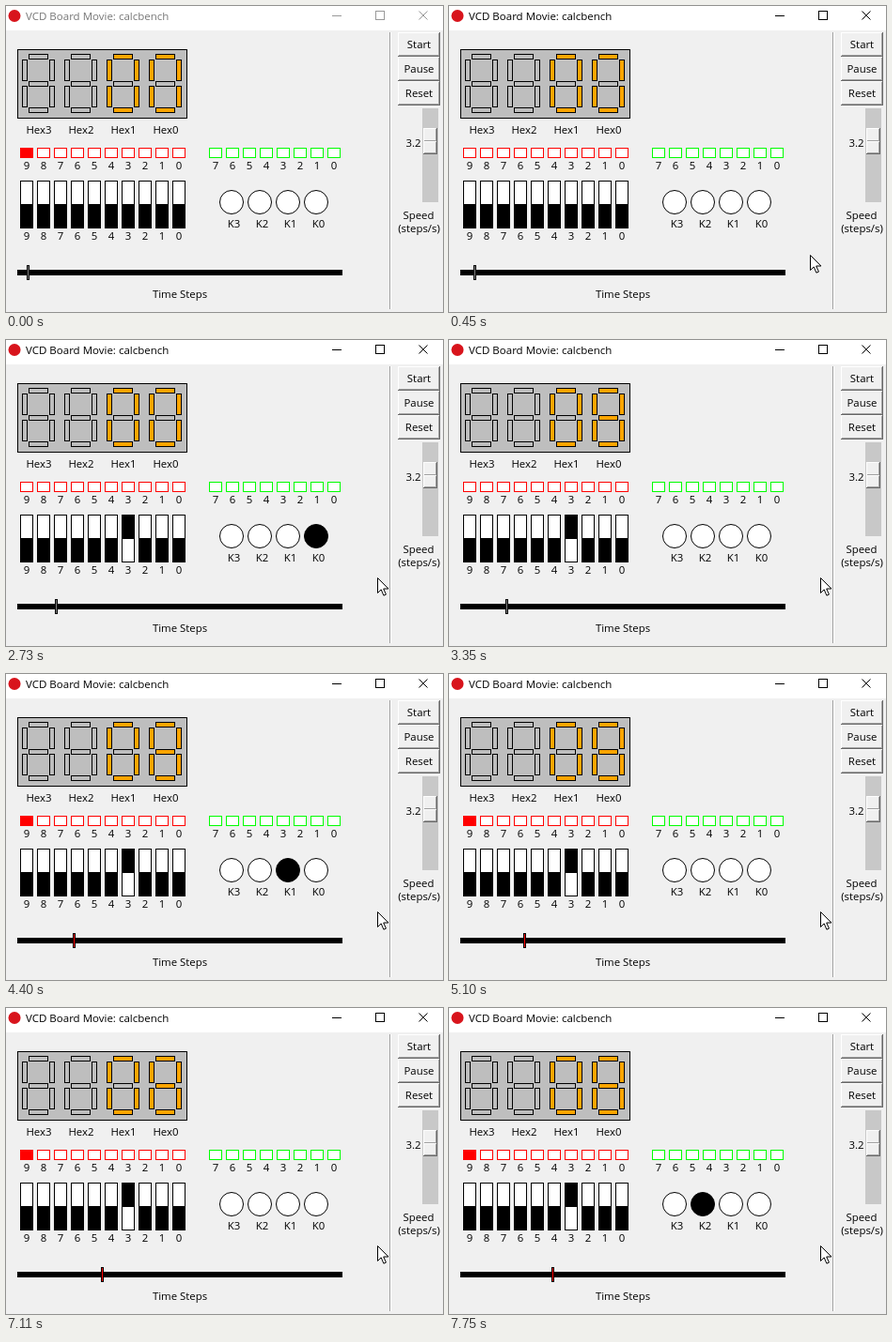
Animation, 465 px wide and 326 px high, one loop 8000 ms. Source, as an HTML page:

```html
<!DOCTYPE html>
<html lang="en">
<head>
<meta charset="utf-8">
<title>VCD Board Movie</title>
<style>
  html, body { margin: 0; width: 100%; height: 100%; overflow: hidden; background: #f0f0f0; }
  svg { display: block; }
  rect, line, .crisp { shape-rendering: crispEdges; }
  text { font: 11.4px "Open Sans", "Noto Sans", sans-serif; text-anchor: middle; }
  #title { font-size: 11.5px; text-anchor: start; }
</style>
</head>
<body>
<svg id="stage" width="465" height="326" viewBox="0 0 465 326"></svg>
<script>
const LOOP = 8000;
const STEP_TIMES = [0, 370, 680, 990, 1290, 1710, 2030, 2350, 2730, 3050, 3350, 3750,
  4070, 4400, 4720, 5100, 5420, 5720, 6100, 6410, 6730, 7110, 7430, 7750];
const SWITCH_STEP = 7, RESULT_STEP = 9;
const PRESSES = [[8, 0], [12, 1], [18, 0], [22, 2]]; // [step, key], held for two steps

const fill = (x, y, w, h, color, id = '') =>
  `<rect id="${id}" x="${x}" y="${y}" width="${w}" height="${h}" fill="${color}"/>`;
const box = (x, y, w, h, color, stroke = '#000', id = '') =>
  `<rect id="${id}" x="${x + .5}" y="${y + .5}" width="${w - 1}" height="${h - 1}" fill="${color}" stroke="${stroke}"/>`;
const label = (x, y, text) => `<text x="${x}" y="${y}">${text}</text>`;
const raised = (x, y, w, h) =>
  fill(x, y, w, h, '#696969') + fill(x, y, w - 1, h - 1, '#fff') +
  fill(x + 1, y + 1, w - 2, h - 2, '#a0a0a0') + fill(x + 1, y + 1, w - 3, h - 3, '#f0f0f0');

function digit(x, place) {
  const lit = place < 2 ? '#ffa500' : '#bebebe';
  const side = [[0, 57], [29, 57], [0, 85], [29, 85]];
  return side.map(([dx, y]) => box(x + dx, y, 6, 23, lit)).join('') +
    box(x + 7, 51, 21, 6, lit) + box(x + 7, 108, 21, 6, lit) +
    box(x + 7, 80, 21, 6, '#bebebe', '#000', 'mid' + place) +
    label(x + 18, 136, 'Hex' + place);
}

function lamps(x, count, color, name) {
  let out = '';
  for (let i = 0; i < count; i++) {
    const n = count - 1 - i;
    out += box(x + 18 * i, 151, 14, 11, '#fff', color, name + n) + label(x + 7 + 18 * i, 174, n);
  }
  return out;
}

function toggles() {
  let out = '';
  for (let i = 0; i < 10; i++) {
    const x = 15 + 18 * i, n = 9 - i;
    out += box(x, 186, 14, 51, '#fff') + fill(x, 211, 14, 26, '#000', 'switch' + n) + label(x + 7, 249, n);
  }
  return out;
}

function keys() {
  let out = '';
  for (let k = 0; k < 4; k++) {
    const x = 330 - 30 * k;
    out += `<circle id="key${k}" cx="${x}" cy="209" r="12.5" stroke="#000"/>` + label(x + 2.5, 236, 'K' + k);
  }
  return out;
}

const titleBar = fill(0, 0, 465, 26, '#fff') +
  '<circle cx="9" cy="10.5" r="6.5" fill="#d8141c"/>' +
  '<text id="title" x="21" y="15">VCD Board Movie: calcbench</text>' +
  '<g id="controls" fill="none"><path class="crisp" d="M347 10.5h10M393.5 5.5h9v9h-9z"/>' +
  '<path d="M439.5 5.5l9 9M448.5 5.5l-9 9"/></g>';

const sidePanel = fill(408, 28, 1, 295, '#a0a0a0') + fill(409, 28, 1, 295, '#fff') +
  ['Start', 'Pause', 'Reset'].map((name, i) =>
    raised(417, 28 + 26 * i, 45, 26) + label(439.5, 45 + 26 * i, name)).join('') +
  fill(443, 109, 17, 100, '#c8c8c8') + raised(444, 130, 15, 28) +
  fill(445, 143, 13, 1, '#a0a0a0') + fill(445, 144, 13, 1, '#fff') +
  label(433.5, 150, '3.2') + label(439, 227, 'Speed') + label(439.5, 241, '(steps/s)');

const $ = id => document.getElementById(id);
$('stage').innerHTML = fill(0, 0, 465, 326, '#f0f0f0') + titleBar + sidePanel +
  box(12, 46, 181, 74, '#bebebe') +
  [3, 2, 1, 0].map((place, i) => digit(17 + 45 * i, place)).join('') +
  lamps(15, 10, '#f00', 'red') + lamps(216, 8, '#0f0', 'green') + toggles() + keys() +
  fill(12, 281, 346, 6, '#000') + label(185, 311, 'Time Steps') +
  '<g id="marker">' + fill(0, 276, 3, 16, '#000') + fill(1, 277, 1, 14, '#808080', 'core') + '</g>' +
  '<path id="cursor" d="M.5.5v16l3.7-3.6 2.7 6.3 2.5-1.1-2.7-6.1h5.2z" fill="#fff" stroke="#000"/>';

const set = (id, name, value) => $(id).setAttribute(name, value);

// The pointer glides in from the bottom edge, sampled every 76 ms.
function drawPointer(t) {
  const active = t >= 70;
  set('title', 'fill', active ? '#000' : '#777');
  set('controls', 'stroke', active ? '#000' : '#999');
  set('cursor', 'visibility', active ? 'visible' : 'hidden');
  const tick = Math.min(8, Math.floor((t - 70) / 76));
  const rest = (1 - tick / 8) ** 1.65;
  set('cursor', 'transform', `translate(${Math.round(395 - 55 * rest)} ${Math.round(253 + 60 * rest)})`);
}

function drawBoard(t) {
  const step = STEP_TIMES.findLastIndex(start => t >= start);
  const clock = step < SWITCH_STEP ? step % 2 === 0 : step % 2 === 1;
  const rising = clock && step > 0 && step !== SWITCH_STEP;
  set('red9', 'fill', clock ? '#f00' : '#fff');
  set('switch3', 'y', step >= SWITCH_STEP ? 186 : 211);
  set('mid0', 'fill', step >= RESULT_STEP ? '#ffa500' : '#bebebe');
  for (let k = 0; k < 4; k++) {
    const down = PRESSES.some(([start, key]) => key === k && step >= start && step < start + 2);
    set('key' + k, 'fill', down ? '#000' : '#fff');
  }
  set('marker', 'transform', `translate(${Math.round(22.18 + 3.77 * step)} 0)`);
  set('core', 'fill', rising ? '#f00' : '#808080');
}

function frame() {
  const t = performance.now() % LOOP;
  drawPointer(t);
  drawBoard(t);
  requestAnimationFrame(frame);
}
frame();
</script>
</body>
</html>
```
